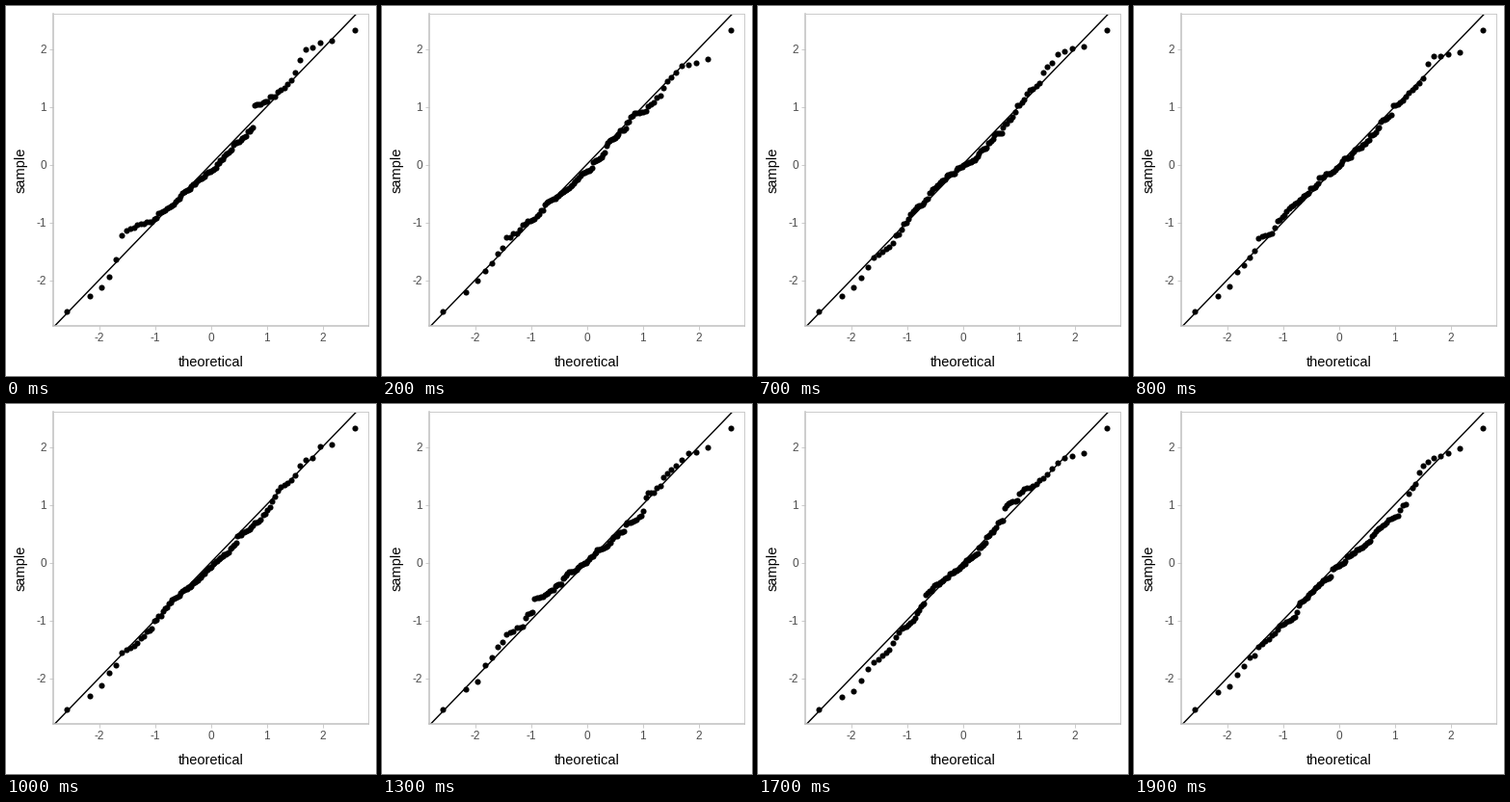
Animation of 384x384 px, one loop 2000 ms. Source, as a matplotlib script:

```python
import math

import matplotlib.pyplot as plt
import numpy as np
from matplotlib.animation import FuncAnimation

SIZE, DPI = 384, 96
FRAMES, STEP = 20, 100
N = 100
LEFT, RIGHT, TOP, BOTTOM = 48.5, 376, 8, 332
X0, Y0, XU, YU = 212.5, 164.5, 58, 60  # pixel origin and pixels per unit

plt.rcParams["font.family"] = "Liberation Sans"


def normal_quantiles(n):
    z = np.linspace(-4, 4, 4001)
    cdf = [0.5 * (1 + math.erf(v / math.sqrt(2))) for v in z]
    return np.interp((np.arange(n) + 0.5) / n, cdf, z)


theory = normal_quantiles(N)

# Typical sample quantile at a few theoretical ones.
KEYS = [(-2.58, -2.55), (-2.17, -2.28), (-1.96, -2.14), (-1.6, -1.6),
        (-1.06, -1.03), (-0.75, -0.63), (-0.19, -0.19), (0.4, 0.32),
        (1.2, 1.19), (1.7, 1.85), (2.17, 2.03), (2.58, 2.32)]
trend = np.interp(theory, *zip(*KEYS))
step_size = np.minimum(np.diff(trend, prepend=trend[0]), 0.05)


def sample(i):
    """Fresh sorted sample: uneven gaps that drift around the trend."""
    rng = np.random.default_rng(40 + i)
    kicks = step_size * (rng.exponential(size=N) - 1)
    drift, y = 0, []
    for base, kick in zip(trend, kicks):
        drift = 0.92 * drift + kick
        y.append(base + drift)
    y[0], y[-1] = trend[0], trend[-1]
    return np.sort(y)


fig = plt.figure(figsize=(SIZE / DPI, SIZE / DPI), dpi=DPI, facecolor="white")
ax = fig.add_axes([LEFT / SIZE, 1 - BOTTOM / SIZE,
                   (RIGHT - LEFT) / SIZE, (BOTTOM - TOP) / SIZE])
ax.set_xlim((LEFT - X0) / XU, (RIGHT - X0) / XU)
ax.set_ylim((Y0 - BOTTOM) / YU, (Y0 - TOP) / YU)


def px(n):
    return n * 72 / DPI


def label(x, y, text, size, color, ha="center", rotation=0):
    fig.text(x / SIZE, 1 - y / SIZE, text, fontsize=size, color=color, ha=ha,
             va="baseline", rotation=rotation, rotation_mode="anchor")


for side, spine in ax.spines.items():
    main = side in ("left", "bottom")
    spine.set_color("#bebebe" if main else "#cccccc")
    spine.set_linewidth(px(1.5 if main else 1))

ticks = range(-2, 3)
ax.set_xticks(ticks)
ax.set_yticks(ticks)
ax.tick_params(length=px(3.7), width=px(1), color="#cccccc",
               labelbottom=False, labelleft=False)
for t in ticks:
    label(X0 + XU * t, 348, str(t), 8.8, "#4d4d4d")
    label(42, Y0 - YU * t + 4.3, str(t), 8.8, "#4d4d4d", ha="right")
label(X0, 374, "theoretical", 11, "black")
label(20, 170, "sample", 11, "black", rotation=90)

ax.plot([-3, 3], [-3, 3], color="black", lw=px(1.42), zorder=2)
dots, = ax.plot(theory, sample(0), "o", color="black", ms=px(6.1), mew=0, zorder=3)


def draw(i):
    dots.set_ydata(sample(i))
    return dots,


anim = FuncAnimation(fig, draw, frames=FRAMES, interval=STEP,
                     init_func=lambda: draw(0), repeat=True, repeat_delay=0)
plt.show()
```
